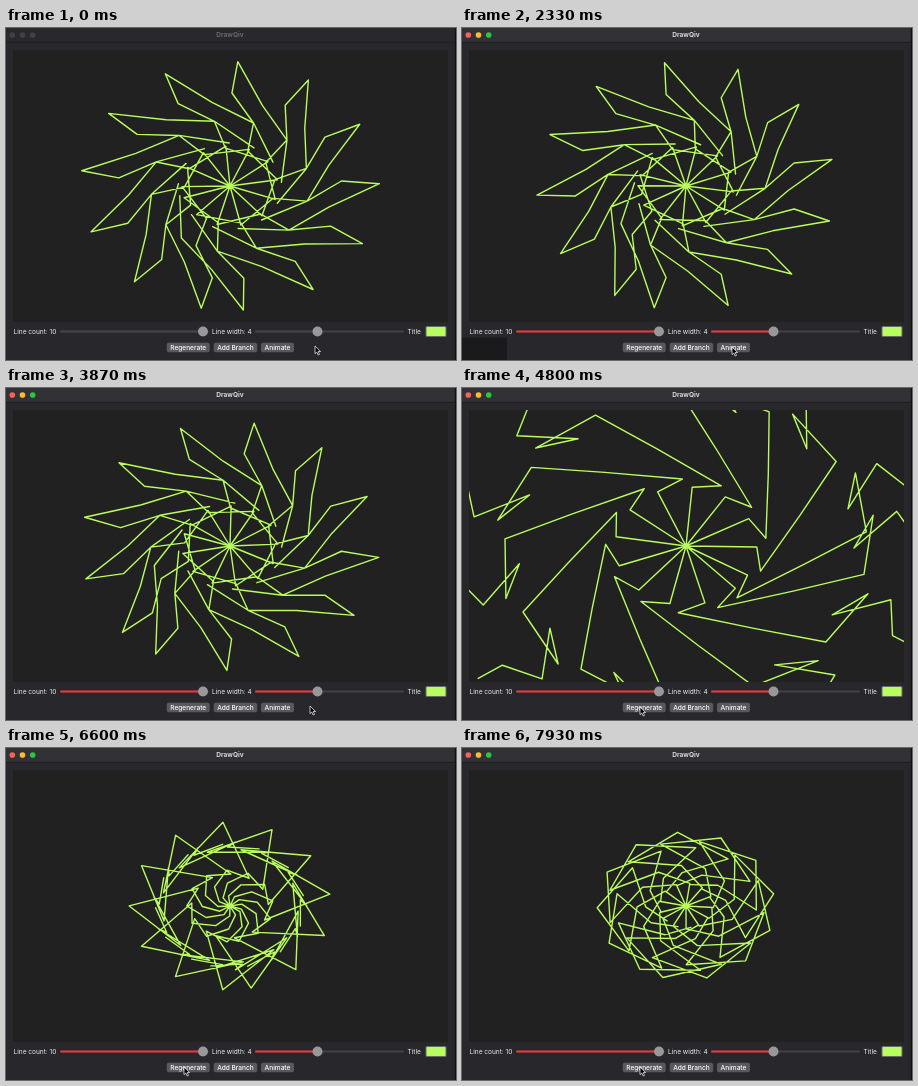
Animation of 450x332 px, one loop 8 s. Source, as an HTML page:

```html
<!DOCTYPE html>
<html lang="en">
<head>
<meta charset="utf-8">
<title>DrawQiv</title>
<style>
  html, body { margin: 0; width: 100%; height: 100%; overflow: hidden; background: #28272b; }
  svg { display: block; width: 100vw; height: 100vh; }
  text { font: 6.55px Inter, "Open Sans", sans-serif; fill: #ececec; }
  #title { font-weight: 700; text-anchor: middle; }
  .button text { text-anchor: middle; fill: #fff; font-weight: 500; }
  .button rect { fill: #59585c; }
  .button.down rect { fill: #7b7a7d; }
  .track { stroke: #434246; stroke-width: 2; stroke-linecap: round; }
  .active .fill { stroke: #ea3636; }
  .knob { fill: #98979a; }
  .light { fill: #414044; }
  .active .light { fill: var(--on); }
  #bar { fill: #29282c; }
  .active #bar { fill: #323135; }
  #title { fill: #69686c; }
  .active #title { fill: #d8d8d8; }
</style>
</head>
<body>
<svg id="app" viewBox="0 0 450 332" preserveAspectRatio="none">
  <defs><clipPath id="clip"><rect x="7" y="22" width="435" height="272"/></clipPath></defs>
  <rect width="450" height="332" fill="#28272b"/>
  <rect id="bar" width="450" height="14"/>
  <path d="M0 14.2H450" stroke="#171719" stroke-width=".6"/>
  <circle class="light" style="--on:#fe5f57" cx="6.3" cy="7" r="2.8"/>
  <circle class="light" style="--on:#febc2e" cx="16.5" cy="7" r="2.8"/>
  <circle class="light" style="--on:#28c840" cx="26.7" cy="7" r="2.8"/>
  <text id="title" x="224" y="9.4">DrawQiv</text>
  <rect x="7" y="22" width="435" height="272" fill="#212122"/>
  <g clip-path="url(#clip)">
    <path id="art" fill="none" stroke="#b9fc5e" stroke-width="1.4" stroke-linecap="round" stroke-linejoin="round"/>
  </g>
  <text x="7.5" y="305.6">Line count: 10</text>
  <text x="206" y="305.6">Line width: 4</text>
  <text x="401.5" y="305.6">Title</text>
  <g id="controls"></g>
  <rect x="419.5" y="298" width="21" height="11" rx="1.5" fill="#6a6a6c"/>
  <rect x="420.5" y="299" width="19" height="9" rx=".8" fill="#b9fc5e"/>
  <rect id="shade" y="309.5" width="45" height="23" fill="#000"/>
  <path d="M449.4 0V332" stroke="#111" stroke-width="1.2"/>
  <path id="cursor" d="M0 0V7.6L1.8 6L3.1 9L4.5 8.4L3.2 5.5H5.6Z" fill="#000" stroke="#fff" stroke-width=".7"/>
</svg>
<script>
const LOOP = 8000, TICK = 1000 / 15;
const ARMS = 13, STEP = 0.5, SPEED = 0.0002, SPIN_START = 816;
const CX = 224, CY = 158, STRETCH = 1.2, RAD = Math.PI / 180;
const $ = id => document.getElementById(id);
const points = (count, rule) => Array.from({ length: count }, (_, i) => rule(i + 1));

function seeded(seed) {
  return () => (seed = seed * 16807 % 2147483647) / 2147483647;
}

// A branch is a list of [degrees from the arm's heading, radius] after the centre.
const blade = [[78, 40], [20, 38], [14.3, 66], [-2, 93], [0, 124.5], [15.5, 85], [43, 66], [82, 43]];
const hook = [[-21, 59], [0, 67], [-40, 100], [-56, 151],
  ...points(3, k => [-72 + 6 * (-1) ** k, 159 + 10 * (k - 1) - (k === 2 ? 29 : 0)]),
  [-68, 194], [-67.5, 218]];

const random = seeded(77);
const wander = points(8, k => [60 * (random() - 0.5), 143 * Math.sin(k * Math.PI / 8) ** 0.7]);

const spiral = points(3, k => [30 * k - 90, 13 * k - 3]);
const swirl = [...spiral, [34, 32], [0, 84], [-44, 57], [8, 64], [2, 59], [27, 62]];

const star = points(7, k => [42 * Math.sin(k * Math.PI / 2), 48 + 26.3 * Math.cos(k - 3.85)]);

// angle: heading of the first arm at time "at"
const figures = [
  { from: 0, at: SPIN_START, angle: 191.1, branch: blade },
  { from: 4730, at: 5730, angle: 167.5, branch: hook },
  { from: 5850, at: 5930, angle: 180, branch: wander },
  { from: 6390, at: 6600, angle: 184.1, branch: swirl },
  { from: 7260, at: 7930, angle: 211.3, branch: star }
];

function ramp(t, from, to) {
  const p = Math.min(1, Math.max(0, (t - from) / (to - from)));
  return p * p * (3 - 2 * p);
}

function slider(x, knob) {
  return `<path class="track" d="M${x} 303.5h147"/><path class="track fill" d="M${x} 303.5H${knob}"/>
    <circle class="knob" cx="${knob}" cy="303.5" r="5"/>`;
}

function button(id, label, x, width) {
  return `<g class="button" id="${id}"><rect x="${x}" y="314.8" width="${width}" height="9.4" rx="2"/>
    <text x="${x + width / 2}" y="321.9">${label}</text></g>`;
}

$("controls").innerHTML = slider(55, 197) + slider(250, 311.5) +
  button("regenerate", "Regenerate", 160.7, 43) +
  button("branch", "Add Branch", 207.7, 43.5) +
  button("animate", "Animate", 255, 33);

function drawFigure({ angle, at, branch }, t) {
  const heading = angle * RAD + (Math.max(t, SPIN_START) - at) * SPEED;
  let d = "";
  for (let i = 0; i < ARMS; i++) {
    d += `M${CX} ${CY}`;
    for (const [degrees, r] of branch) {
      const a = heading + i * STEP + degrees * RAD;
      d += `L${(CX + STRETCH * r * Math.sin(a)).toFixed(2)} ${(CY - r * Math.cos(a)).toFixed(2)}`;
    }
  }
  $("art").setAttribute("d", d);
}

function render(time) {
  const t = Math.floor((time % LOOP + 5) / TICK) * TICK;
  const pressed = click => t >= click - 100 && t < click + 30;
  drawFigure(figures.findLast(f => t >= f.from), t);
  $("app").classList.toggle("active", t >= 790);
  $("animate").classList.toggle("down", pressed(SPIN_START));
  $("regenerate").classList.toggle("down", figures.slice(1).some(f => pressed(f.from)));

  const x = 309 - 39 * ramp(t, 70, 600) + 34 * ramp(t, 2700, 3300) - 126 * ramp(t, 4270, 4600);
  const y = 318 + ramp(t, 70, 600) - ramp(t, 2700, 3300) + ramp(t, 4270, 4600);
  $("cursor").setAttribute("transform", `translate(${x} ${y})`);
  $("shade").setAttribute("opacity", t < 860 ? 0 : 1 - ramp(t, 1650, 2800));
}

const start = performance.now();
function frame() {
  render(performance.now() - start);
  requestAnimationFrame(frame);
}
frame();
</script>
</body>
</html>
```
